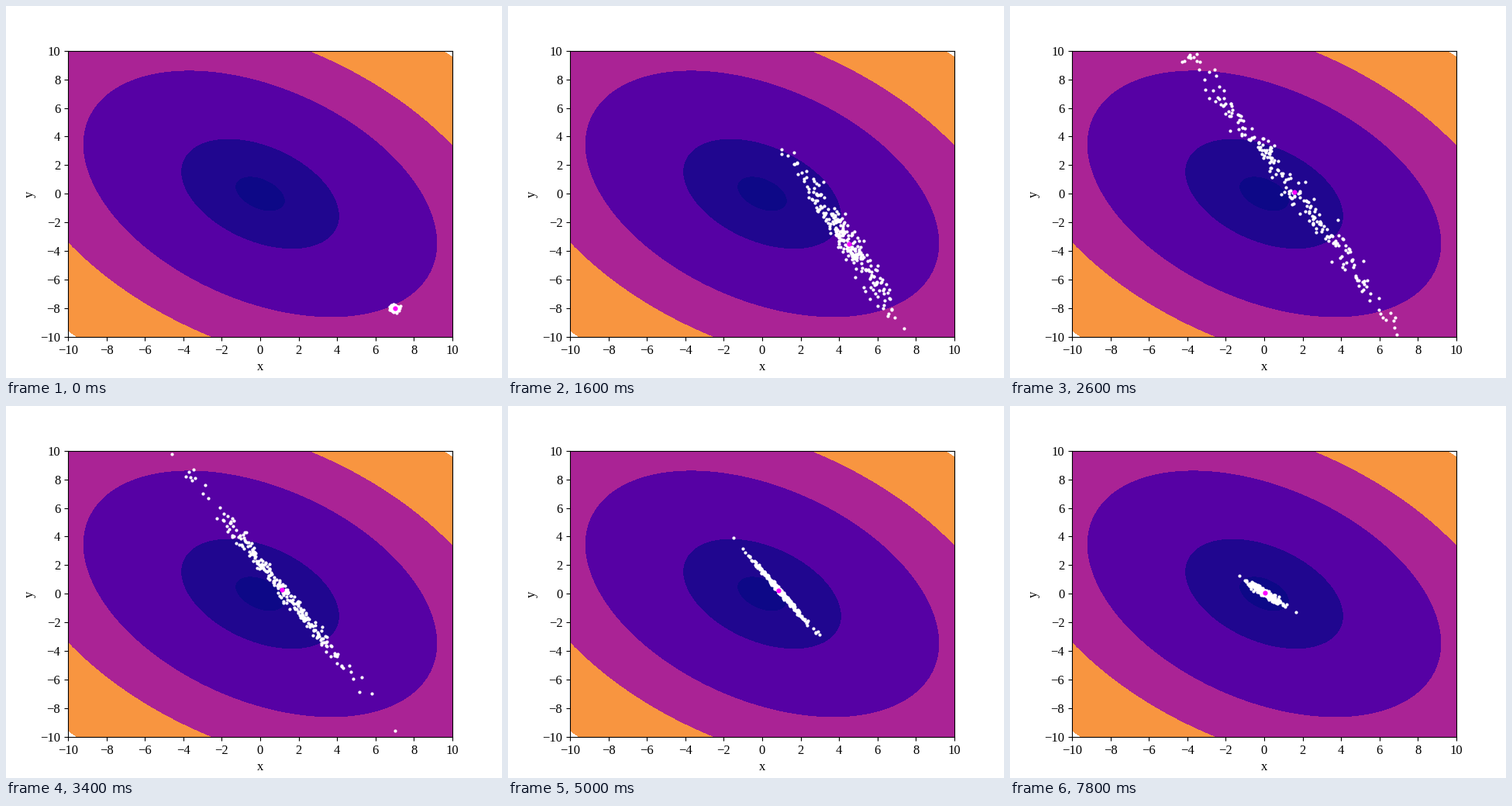
These frames come from a looping animation (640 by 480 pixels, 8000 ms). A matplotlib script:

```python
import numpy as np
import matplotlib.pyplot as plt
from matplotlib.animation import FuncAnimation

FRAMES, STEP_MS = 40, 200
POINTS = 250

# the cloud grows until it covers the optimum, then contracts onto it
KEY_GENS = [0, 6, 8, 13, 25, 39]
LENGTH = [0.105, 0.57, 2.25, 5.7, 1.15, 0.36]
WIDTH = [0.105, 0.24, 0.32, 0.32, 0.07, 0.15]

plt.rcParams["font.family"] = "Liberation Serif"
plt.rcParams["font.size"] = 12


def spread(gen, values):
    return np.exp(np.interp(gen, KEY_GENS, np.log(values)))


def approach(gen, start, rest, scale):
    """Leave start slowly, then settle at rest."""
    return rest + (start - rest) * np.exp(-(gen / scale) ** 3.3)


def mean_at(gen):
    t = gen / (FRAMES - 1)
    x = approach(gen, 7, 0.05 + 1.3 * (1 - t ** 2.2), 9.48)
    y = approach(gen, -8, 0.05 + 0.25 * (1 - t ** 4), 8.62)
    return np.array([x, y])


def population(gen):
    rng = np.random.default_rng(100 + gen)
    along, across = rng.normal(size=(2, POINTS))
    tilt = -0.6 * np.tanh(gen / 7) - 0.5 * (gen / (FRAMES - 1)) ** 5
    dy = spread(gen, LENGTH) * along
    dx = tilt * dy + spread(gen, WIDTH) * across
    return mean_at(gen) + np.column_stack([dx, dy])


fig, ax = plt.subplots(figsize=(6.4, 4.8), dpi=100)
grid = np.linspace(-10, 10, 201)
X, Y = np.meshgrid(grid, grid)
ax.contourf(X, Y, 0.7 * X**2 + 0.6 * X * Y + 0.8 * Y**2,
            levels=[0, 1, 10, 50, 100, 200], cmap="plasma")
ticks = np.arange(-10, 11, 2)
ax.set(xlim=(-10, 10), ylim=(-10, 10), xticks=ticks, yticks=ticks,
       xlabel="x", ylabel="y")

cloud_dots = ax.scatter([], [], s=9, c="white", linewidths=0, zorder=2)
mean_dot = ax.scatter([], [], s=20, c="magenta", linewidths=0, zorder=2.1)


def draw(gen):
    cloud_dots.set_offsets(population(gen))
    mean_dot.set_offsets([mean_at(gen)])
    return cloud_dots, mean_dot


anim = FuncAnimation(fig, draw, frames=FRAMES, interval=STEP_MS,
                     init_func=lambda: draw(0), repeat=True, repeat_delay=0)
plt.show()
```
